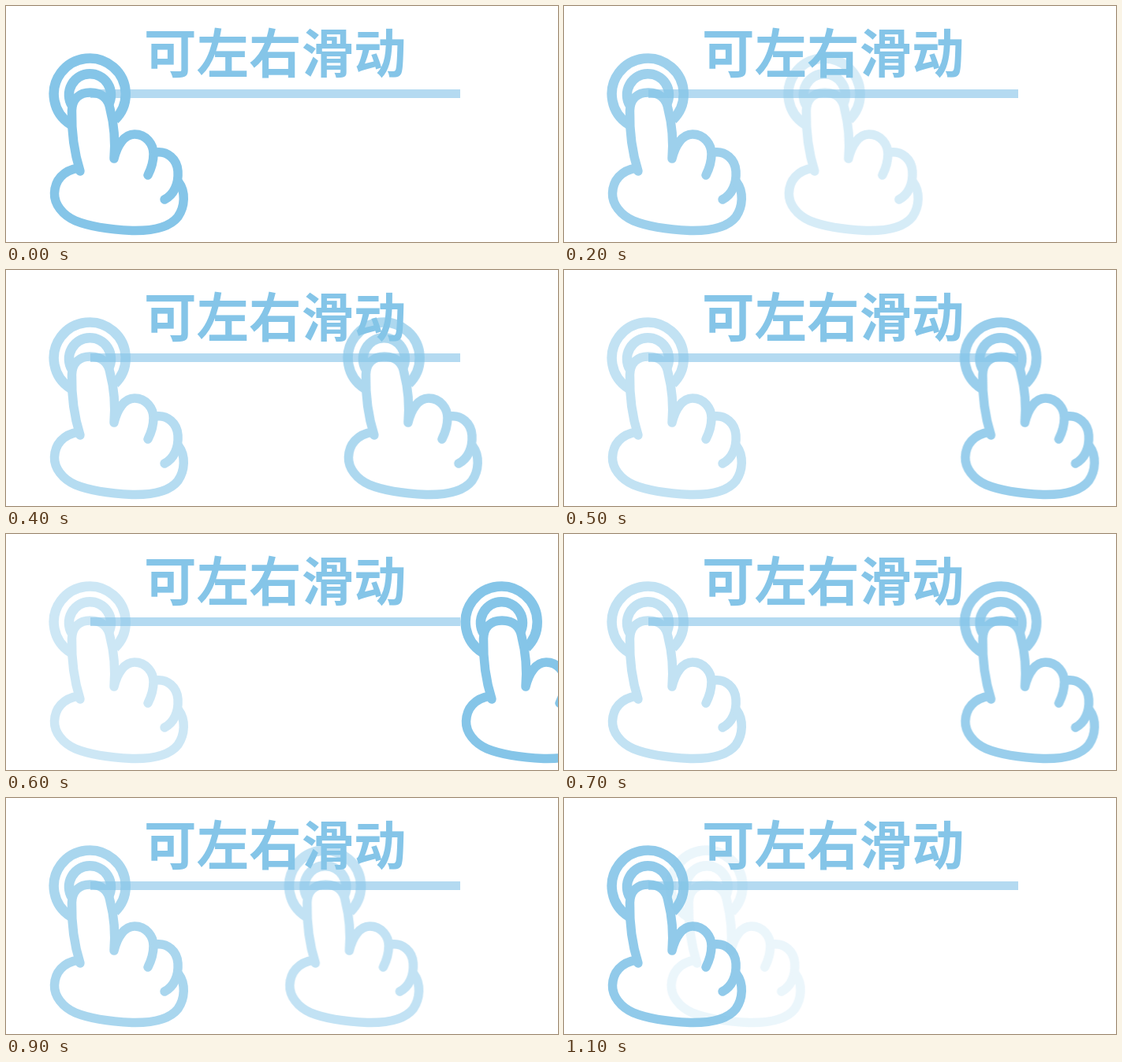
Animation, 700 px wide and 300 px high, one loop 1200 ms. Source, as an HTML page:

```html
<!DOCTYPE html>
<html lang="zh-CN">
<head>
<meta charset="utf-8">
<title>可左右滑动</title>
<style>
  html, body { margin: 0; width: 100%; height: 100%; overflow: hidden; background: #fff; }
  svg { display: block; width: 700px; height: 300px; }
  text { font: 900 66.5px "Noto Sans CJK SC", "Noto Sans CJK", sans-serif; fill: #85c5e8; }
  .hand { fill: none; stroke: #85c5e8; stroke-width: 11.5; stroke-linecap: round; stroke-linejoin: round; }
  .ring { stroke-width: 12.5; stroke-linecap: butt; }

  .rest { animation: dim 1.2s steps(6) infinite; }
  .swipe { animation: show 1.2s steps(6) infinite, slide 1.2s steps(6) infinite; }

  @keyframes dim { 0%, 100% { opacity: 1; } 50% { opacity: .4; } }
  @keyframes show { 0%, 100% { opacity: 0; } 50% { opacity: 1; } }
  @keyframes slide {
    0% { transform: translateX(74.6px); }
    50% { transform: translateX(522px); animation-timing-function: steps(4); }
    83.33% { transform: translateX(223.8px); animation-timing-function: step-end; }
    91.66%, 100% { transform: translateX(74.6px); }
  }
</style>
</head>
<body>
<svg viewBox="0 0 700 300">
  <defs>
    <g id="hand" class="hand">
      <path class="ring" d="M82 150.5A45.5 45.5 0 1 1 138 144.5"/>
      <path class="ring" d="M83.5 126A26.5 26.5 0 1 1 130 125"/>
      <!-- index finger, two knuckles, palm -->
      <path d="M94 210C86 185 83 160 83.5 133C84 118 93 110 107 110C122 110 130 118 132 131C137 150 139 170 137 194C141 177 150 163 163 163C178 163 187 176 187 188C187 198 184 207 180 215"/>
      <path d="M190 186C205 184 217 195 218 210C219 226 213 240 201 246"/>
      <path d="M219 224C228 236 227 255 218 268C207 282 185 286 160 285.5C130 284 105 280 88 273C72 266 61 252 61.5 238C62 222 72 209 92 206"/>
    </g>
  </defs>
  <rect x="107" y="106" width="469" height="11" fill="#b4daf1"/>
  <text x="175" y="85">可左右滑动</text>
  <g class="rest"><use href="#hand"/></g>
  <g class="swipe"><use href="#hand"/></g>
</svg>
</body>
</html>
```
